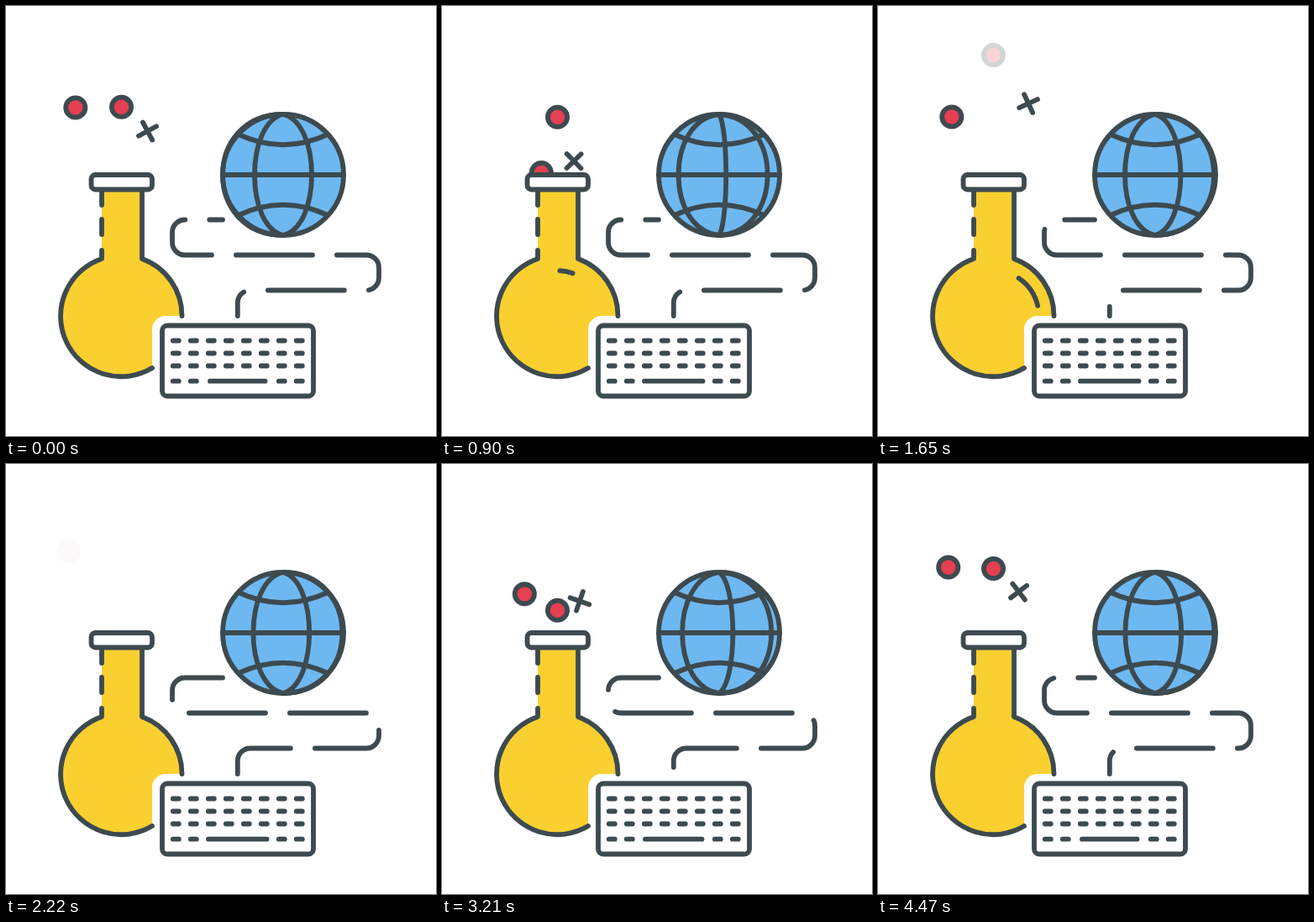
Recreate the animation shown at these times as an HTML page. Size 512x512 px, loop 4500 ms.

```html
<!DOCTYPE html>
<html lang="en">
<head>
<meta charset="utf-8">
<title>Science and technology</title>
<style>
  html, body { margin: 0; width: 100%; height: 100%; overflow: hidden; background: #fff; }
  svg { display: block; width: 100vw; height: 100vh; }
  svg * { stroke-linecap: round; stroke-linejoin: round; }
  .ink { fill: none; stroke: #3d4a4f; stroke-width: 5.8; }
  .white { fill: #fff; }
  .blue { fill: #6eb8f1; }
  .yellow { fill: #f9d030; }
  .red { fill: #e63f51; }
</style>
</head>
<body>
<svg viewBox="0 0 512 512">
  <clipPath id="aboveNeck"><rect width="512" height="208"/></clipPath>

  <g id="bubbles" clip-path="url(#aboveNeck)"></g>

  <!-- flask -->
  <circle class="yellow" cx="137.5" cy="369" r="72"/>
  <rect class="yellow" x="114" y="214" width="48" height="95"/>
  <rect class="white" x="174" y="369" width="200" height="106" rx="16"/>
  <path class="ink" d="M162 218V301A72 72 0 0 1 209.500 369"/>
  <path class="ink" d="M174 431A72 72 0 1 1 114 301V291M114 272V254M114 237V219"/>
  <rect class="ink white" x="101.500" y="201" width="72.500" height="17.500" rx="5"/>
  <path class="ink" id="shine"/>

  <!-- cable -->
  <path class="ink" id="cable" stroke-dasharray="91 29"
    d="M275.800 369V353.500A15 15 0 0 1 290.800 338.500H429A15 15 0 0 0 444 323.500V311.500A15 15 0 0 0 429 296.500H213A15 15 0 0 1 198 281.500V269.500A15 15 0 0 1 213 254.500H258"/>

  <!-- globe -->
  <circle class="ink blue" cx="330" cy="201" r="72"/>
  <path class="ink" d="M258 201H402M277 153Q330 177.500 383 153M277 249Q330 224.500 383 249"/>
  <path class="ink" id="meridians"/>

  <!-- keyboard -->
  <rect class="ink white" x="186" y="380.500" width="180" height="84" rx="6"/>
  <path class="ink" id="keys"/>
  <path class="ink" id="space"/>
</svg>
<script>
const LOOP = 4500, STEP = 30, FRAMES = LOOP / STEP;
const LIFE = 50; // bubble rise time, in steps
const $ = id => document.getElementById(id);
const clamp = v => Math.max(0, Math.min(1, v));
const mix = (a, b, p) => a + (b - a) * p;
const soften = (x, k) => x - k * Math.sin(2 * Math.PI * x) / (2 * Math.PI);
const smooth = u => u * u * (3 - 2 * u);

// Keys
let keyPath = '';
for (let row = 0; row < 4; row++) {
  for (let col = 0; col < 8; col++) {
    if (row === 3 && col > 1 && col < 6) continue;
    keyPath += `M${198.8 + col * 21} ${row === 3 ? 446.7 : 398.5 + row * 15}h7`;
  }
}
$('keys').setAttribute('d', keyPath);

// Things that rise from the flask
const bubbles = [];
function addStream(shape, from, to, births) {
  for (const birth of births) {
    const el = document.createElementNS('http://www.w3.org/2000/svg', shape === 'dot' ? 'circle' : 'path');
    if (shape === 'dot') el.setAttribute('r', 11.6);
    else el.setAttribute('d', 'M-12 0H12M0 -12V12');
    el.setAttribute('class', shape === 'dot' ? 'ink red' : 'ink');
    $('bubbles').append(el);
    bubbles.push({ el, from, to, birth, spins: shape === 'cross' });
  }
}
addStream('dot', [125.5, 214], [75, 104], [20.3, 80.6, 110.4]);
addStream('cross', [145.7, 220], [183, 104], [12.5, 82.4, 120.8]);
addStream('dot', [137.5, 220], [137.5, 58.5], [3.4, 90.4, 120.6]);

function drawBubble({ el, from, to, birth, spins }, frame) {
  const age = (frame - birth + FRAMES) % FRAMES / LIFE;
  const x = clamp(age);
  const p = soften(x, 0.35);
  const turn = spins ? 148.5 * (1 - Math.cos(Math.PI * x)) - 35.6 : 0;
  el.setAttribute('transform',
    `translate(${mix(from[0], to[0], p)} ${mix(from[1], to[1], p)}) rotate(${turn})`);
  el.setAttribute('opacity', smooth(clamp((1.09 - age) / 0.19)));
}

function meridian(d) {
  const c = 20 * (1 - Math.abs(d) / 72), x = 330 + d * 4 / 3;
  return `M330 129C${x} ${129 + c} ${x} ${273 - c} 330 273`;
}

function drawShine(phase) {
  const head = clamp(phase * 1.2);
  const tail = clamp((phase - 0.467) / 0.386) ** 2;
  const point = p => {
    const a = (1 - p) * 77 * Math.PI / 180;
    return `${137.5 + 54 * Math.sin(a)} ${369 - 54 * Math.cos(a)}`;
  };
  const visible = head - tail > 0.01;
  $('shine').setAttribute('d', visible ? `M${point(tail)}A54 54 0 0 0 ${point(head)}` : '');
}

function pressAt(frame, centre, reach) {
  const gap = Math.abs((frame - centre + 1.5 * FRAMES) % FRAMES - FRAMES / 2);
  return smooth(clamp(1 - gap / reach));
}

function draw(frame) {
  const t = frame / FRAMES;
  bubbles.forEach(b => drawBubble(b, frame));
  drawShine(t * 4 % 1);
  $('cable').setAttribute('stroke-dashoffset', -60 - t * 5 % 1 * 120);
  const p = soften(t * 8 % 1, 0.22);
  $('meridians').setAttribute('d',
    meridian(mix(-72, -34, p)) + meridian(mix(-34, 34, p)) + meridian(mix(34, 72, p)));
  const inset = 2 * Math.max(pressAt(frame, 149.5, 6), pressAt(frame, 104, 6));
  $('space').setAttribute('d', `M${241 + inset} 446.7H${310.5 - inset}`);
}

const start = performance.now();
function tick() {
  draw(Math.floor((performance.now() - start) % LOOP / STEP));
  requestAnimationFrame(tick);
}
tick();
</script>
</body>
</html>
```
